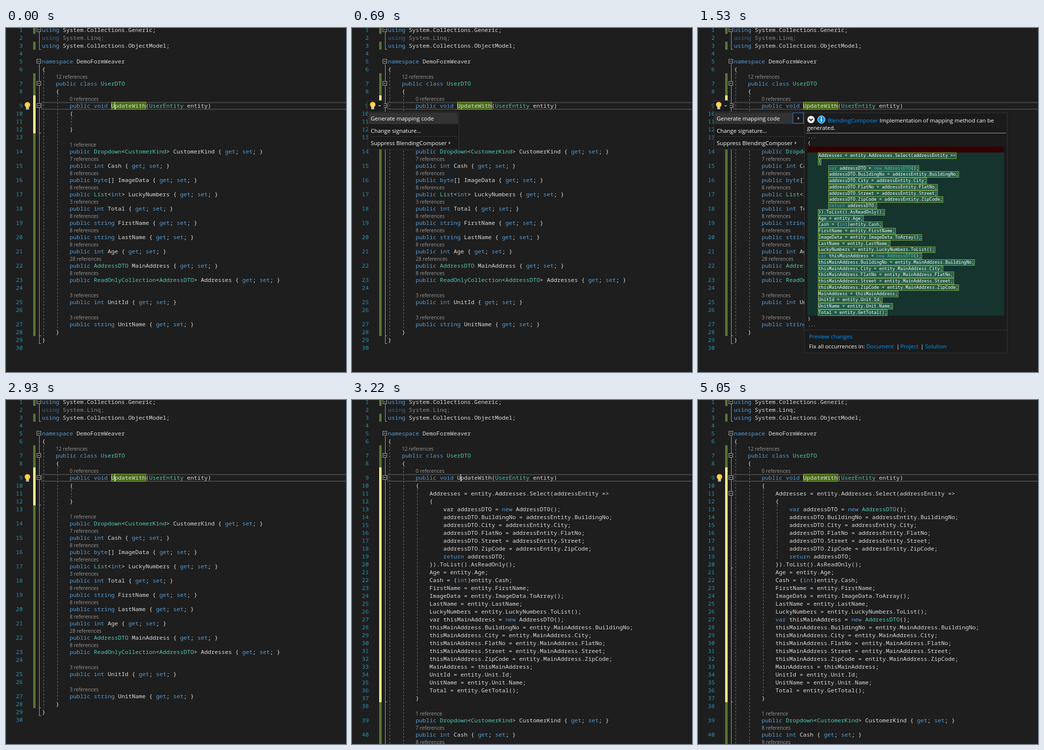
These frames come from a looping animation (689x699 px, 5.34 s). An HTML page:

```html
<!DOCTYPE html>
<html lang="en">
<head>
<meta charset="utf-8">
<title>Code generation in an editor</title>
<style>
html, body { margin: 0; width: 100%; height: 100%; overflow: hidden; background: #1e1e1e; }
svg { display: block; width: 689px; height: 699px; }
text { fill: #dcdcdc; white-space: pre; }
.code { font: 11.667px "Noto Sans Mono", "DejaVu Sans Mono", monospace; }
.small { font-size: 8.94px; font-weight: 500; fill: #fff; }
.ui { font: 500 11.4px "Open Sans", "Noto Sans", sans-serif; fill: #fff; }
.lens { font: 10.2px "Open Sans", "Noto Sans", sans-serif; fill: #999; animation: stale 5340ms step-end infinite; }
.num { fill: #2b91af; text-anchor: end; }
.k { fill: #569cd6; }
.t { fill: #4ec9b0; }
.link { fill: #0097fb; }
.layer { visibility: hidden; }
.guide { stroke: #717171; stroke-dasharray: 4 3; }
.fold { stroke: #a5a5a5; fill: none; }
.panel { fill: #1b1b1c; stroke: #333337; }
.match { fill: #486b17; stroke: #7fa23a; }
.added { fill: #235c4a; stroke: #82a23c; }
@keyframes stale {
  0% { fill: #999; }
  81.64% { fill: #777; }
  90.44% { fill: #999; }
}
</style>
</head>
<body>
<svg id="stage" viewBox="0 0 689 699"></svg>
<script>
const LOOP = 5340;
const TOKEN = /(\b(?:using|namespace|public|class|void|int|string|byte|get|set|var|new|return|UserDTO|UserEntity|AddressDTO|Dropdown|ReadOnlyCollection)\b|CustomerKind(?=>)|List(?=<))/;
const NEVER = /^$/;
const UNRESOLVED = /^(var|AddressDTO)$/;

const head = [
  'using System.Collections.Generic;',
  '',
  'using System.Collections.ObjectModel;',
  '',
  'namespace DemoFormWeaver',
  '{',
  '12|    public class UserDTO',
  '    {',
  '0|        public void UpdateWith(UserEntity entity)'
];

const parts = ['BuildingNo', 'City', 'FlatNo', 'Street', 'ZipCode'];
const copy = (to, from, pad) => parts.map(p => `${pad}${to}.${p} = ${from}.${p};`);
const pad3 = ' '.repeat(12), pad4 = ' '.repeat(16);
const body = [
  pad3 + 'Addresses = entity.Addresses.Select(addressEntity =>',
  pad3 + '{',
  pad4 + 'var addressDTO = new AddressDTO();',
  ...copy('addressDTO', 'addressEntity', pad4),
  pad4 + 'return addressDTO;',
  ...[
    '}).ToList().AsReadOnly();',
    'Age = entity.Age;',
    'Cash = (int)entity.Cash;',
    'FirstName = entity.FirstName;',
    'ImageData = entity.ImageData.ToArray();',
    'LastName = entity.LastName;',
    'LuckyNumbers = entity.LuckyNumbers.ToList();',
    'var thisMainAddress = new AddressDTO();'
  ].map(s => pad3 + s),
  ...copy('thisMainAddress', 'entity.MainAddress', pad3),
  ...[
    'MainAddress = thisMainAddress;',
    'UnitId = entity.Unit.Id;',
    'UnitName = entity.Unit.Name;',
    'Total = entity.GetTotal();'
  ].map(s => pad3 + s)
];

const open = '        {', close = '        }';
const prop = (refs, name) => `${refs}|        public ${name} { get; set; }`;
const kind = prop(1, 'Dropdown<CustomerKind> CustomerKind');
const emptyMethod = [
  open, '', close, '',
  kind,
  prop(7, 'int Cash'),
  prop(8, 'byte[] ImageData'),
  prop(8, 'List<int> LuckyNumbers'),
  prop(3, 'int Total'),
  prop(8, 'string FirstName'),
  prop(8, 'string LastName'),
  prop(8, 'int Age'),
  prop(28, 'AddressDTO MainAddress'),
  prop(8, 'ReadOnlyCollection<AddressDTO> Addresses'),
  '',
  prop(3, 'int UnitId'),
  '',
  prop(3, 'string UnitName'),
  '    }', '}', ''
];
const filledMethod = [open, ...body, close, '', kind];

const escape = s => s.replace(/</g, '&lt;').replace(/>/g, '&gt;');
const colour = (src, skip = NEVER) => src.split(TOKEN).map((s, i) =>
  i % 2 && !skip.test(s)
    ? `<tspan class="${/^[a-z]/.test(s) ? 'k' : 't'}">${s}</tspan>`
    : escape(s)).join('');
const text = (cls, x, y, content) => `<text class="${cls}" x="${x}" y="${y}">${content}</text>`;
const rect = (x, y, w, h, attrs) => `<rect x="${x}" y="${y}" width="${w}" height="${h}" ${attrs}/>`;
const path = (d, attrs) => `<path d="${d}" ${attrs}/>`;
const fill = c => `fill="${c}"`;
const indent = s => s.length - s.trimStart().length;

const lens = (refs, x, y) =>
  text('lens', x, y, `${refs} reference${refs == 1 ? '' : 's'}`);

// Sets numbered rows below y; a "count|" prefix adds a reference line above the row.
const flow = (n, y, rows, skip) => rows.map(row => {
  const [, refs, src] = row.match(/^(?:(\d+)\|)?(.*)$/);
  const x = 73 + 7 * indent(src);
  y += refs ? 29 : 16;
  return text('code num', 34, y + 4, n++)
    + (refs ? lens(refs, x, y - 10.5) : '')
    + text('code', x, y + 4, colour(src.trim(), skip));
}).join('');

const guide = (x, y1, y2) => path(`M${x + .5} ${y1}V${y2}`, 'class="guide"');
const fold = y => rect(62.5, y - 4.5, 8, 8, 'style="fill:#1e1e1e" class="fold"')
  + path(`M64 ${y - .5}h5`, 'class="fold"');
const outline = (y1, y2) => path(`M67.5 ${y1}V${y2}`, 'class="fold"');
const tick = y => path(`M67 ${y + .5}h4`, 'class="fold"');
const bar = (y1, y2, c = '#577430') => rect(55, y1, 5, y2 - y1, fill(c));
const yellow = '#eff284';
const bulb = (x, y) => `<circle cx="${x}" cy="${y - 1.5}" r="5.6" fill="#fc3"/>`
  + path(`M${x - 2} ${y - 3}l2 2 2-2M${x} ${y - 1}v4`, 'stroke="#fff3c0" fill="none"')
  + rect(x - 3, y + 3, 6, 5, fill('#e8e8e8'))
  + path(`M${x - 3} ${y + 5.5}h6`, 'stroke="#555"');
const arrow = (x, y) => path(`M${x} ${y - 3}l4 3-4 3z`, fill('#999'));

const spans = [];
function layer(windows, content) {
  const id = 'show' + spans.length;
  const at = ms => Math.max(0, (ms - 1) / LOOP * 100) + '%';
  spans.push(`@keyframes ${id}{` + windows.map(([from, to]) =>
    `${at(from)}{visibility:visible}` + (to < LOOP ? `${at(to)}{visibility:hidden}` : '')).join('') + '}');
  return `<g class="layer" style="animation:${id} ${LOOP}ms step-end infinite">${content}</g>`;
}

function preview() {
  const step = 12.76, cw = 5.364, x0 = 222.5;
  const code = (x, y, s) => text('code small', x, y + 3, s);
  const rows = body.map((row, i) => {
    const src = row.slice(8), line = src.trim();
    const x = x0 + cw * indent(src), y = 259 + step * i;
    return rect(Math.round(x) - .5, Math.round(y - 6) + .5, Math.round(line.length * cw + 1), 12, 'class="added"')
      + code(x, y, colour(line));
  }).join('');
  const ui = (x, y, s, cls = '') => text('ui ' + cls, x, y + 4, s);
  return rect(192.5, 172.5, 21, 21, 'fill="#1b1b1c" stroke="#2f7fd6"') + arrow(202, 183.5)
    + rect(215.5, 172.5, 411, 488, 'class="panel"')
    + '<circle cx="229" cy="186" r="7.5" fill="#f1f1f1"/>'
    + path('M225.5 184.5l3.5 3.5 3.5-3.5', 'stroke="#1b1b1c" stroke-width="2" fill="none"')
    + '<circle cx="250" cy="186" r="7.5" fill="#1a94dc" stroke="#f1f1f1"/>'
    + rect(249, 184, 2, 6, fill('#fff')) + rect(249, 181, 2, 2, fill('#fff'))
    + ui(263, 188, 'BlendingComposer', 'link')
    + ui(368, 188, 'Implementation of mapping method can be')
    + ui(221, 203, 'generated.')
    + path('M219 213.5H624', 'stroke="#a0a0a0"')
    + code(x0, 221, '...') + code(x0, 234, '{')
    + rect(222, 241, 398, 12, fill('#330000'))
    + rect(222, 253, 398, 331.5, fill('#15342d'))
    + rows
    + code(x0, 591, '}') + code(x0, 603, '...')
    + path('M216 613.5H626', 'stroke="#333337"')
    + ui(225, 627, 'Preview changes', 'link')
    + ui(225, 647, 'Fix all occurrences in:')
    + ui(341, 647, 'Document', 'link') + ui(402, 647, '|')
    + ui(410, 647, 'Project', 'link') + ui(451, 647, '|')
    + ui(460, 647, 'Solution', 'link');
}

const menu = rect(31.5, 147.5, 33, 23, 'class="panel"') + bulb(42, 157)
  + path('M53 157h6l-3 3z', fill('#999'))
  + rect(32.5, 170.5, 184, 76, 'class="panel"')
  + rect(34, 172, 181, 23, fill('#333334'))
  + text('ui', 38, 188, 'Generate mapping code')
  + text('ui', 38, 213, 'Change signature...')
  + path('M38 220.5H214', 'stroke="#333337"')
  + text('ui', 38, 238, 'Suppress BlendingComposer')
  + arrow(196, 233.5);

const dots = [[358, 289], [364, 467.5]].map(([x, y]) =>
  [0, 3, 6].map(d => rect(x + d, y, 1.5, 1.5, fill('#a5a5a5'))).join('')).join('');

const linq = text('code', 73, 24, colour('using System.Linq;'));

const emptyMargin = bar(137, 214, yellow) + bar(214, 626)
  + outline(73, 641) + tick(213) + tick(625) + tick(641)
  + guide(76, 92, 626) + guide(104, 137, 610) + guide(132, 182, 198);
const filledMargin = bar(137, 614, yellow) + bar(614, 699)
  + outline(73, 699) + tick(613)
  + guide(76, 92, 699) + guide(104, 137, 699) + guide(132, 182, 598);
const tail = cash => flow(40, 651, [prop(cash, 'int Cash')]) + lens(cash + 1, 129, 698.5);

document.getElementById('stage').innerHTML =
  rect(688, 0, 1, 699, fill('#151515'))
  + bar(0, 12) + bar(28, 44) + bar(92, 137)
  + outline(4, 43) + tick(43)
  + layer([[0, 3220]], emptyMargin)
  + layer([[3220, LOOP]], filledMargin)
  + path('M689 151.5H72.5V165H689', 'fill="none" stroke="#464646" stroke-width="2"')
  + [4, 68, 113, 158].map(fold).join('')
  + layer([[0, 3220], [5050, LOOP]], rect(213.5, 150.5, 70, 15, 'class="match"'))
  + flow(1, -12, head)
  + layer([[0, 3980]], `<g opacity=".55">${linq}</g>`)
  + layer([[3980, LOOP]], linq)
  + layer([[0, 3220]], flow(10, 158, emptyMethod))
  + layer([[3220, 3450]], flow(10, 158, filledMethod, UNRESOLVED))
  + layer([[3450, LOOP]], flow(10, 158, filledMethod))
  + layer([[3220, 4830]], tail(7))
  + layer([[4830, LOOP]], tail(8))
  + layer([[4970, LOOP]], fold(190) + tick(341) + guide(160, 214, 326))
  + layer([[0, 690], [2930, 3220], [3840, LOOP]], bulb(43.5, 157.5))
  + layer([[0, 150], [610, 690], [2930, 4830]], rect(220, 150, 1, 15, fill('#dcdcdc')))
  + layer([[690, 2930]], menu)
  + layer([[1530, 2930]], preview())
  + layer([[2300, 2930]], dots);

const sheet = document.createElement('style');
sheet.textContent = spans.join('\n');
document.head.append(sheet);
</script>
</body>
</html>
```
